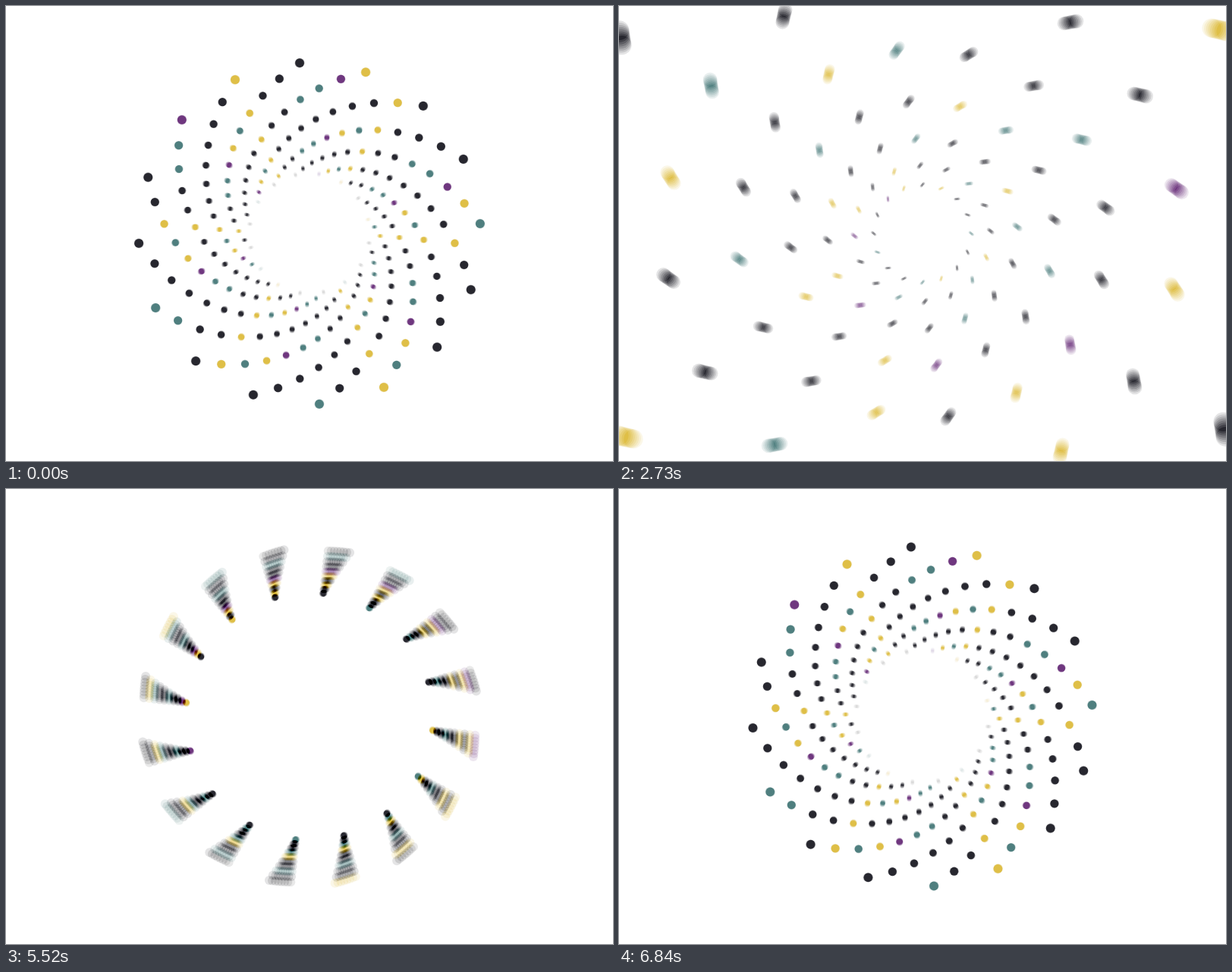
Recreate the animation shown at these times as an HTML page with a canvas. Size 800x600 px, loop 6.87 s.

```html
<!DOCTYPE html>
<html lang="en">
<head>
<meta charset="utf-8">
<title>Spiral of dots</title>
<style>
  html, body { margin: 0; width: 100%; height: 100%; overflow: hidden; background: #fff; }
  canvas { display: block; width: 800px; height: 600px; }
</style>
</head>
<body>
<canvas id="stage" width="800" height="600"></canvas>
<script>
const ctx = document.getElementById('stage').getContext('2d', { alpha: false });

const FRAME_MS = 30, FRAMES = 229, START = 94;
const SAMPLES = 8, SHUTTER = 0.5;
const DOT = 0.027;                      // dot size relative to its ring
const REACH = 530;                      // beyond this radius a ring is off stage
const { PI, exp, cos, sin, max, min } = Math;

// Dot colours clockwise round every ring
const PALETTE = { D: [40, 39, 44], Y: [221, 188, 70], T: [80, 128, 124], P: [110, 54, 125] };
const negative = rgb => `rgb(${rgb.map(v => 255 - v).join()})`;
const inks = [...'DYDDTDDYTDDTDDPY'].map(c => negative(PALETTE[c]));

const logistic = (t, mid, width) => 1 / (1 + exp((mid - t) / width));
const bell = (t, mid, width) => exp(-(((t - mid) / width) ** 2));

// Final fly-through, as a logarithm of scale
const zoom = t => 0.000515 * max(0, t - 152) ** 2.1;

// Springs open from the centre, then grows ever more slowly
function firstRadius(t) {
  const spring = 1 - exp(-t / 16) * cos(0.057 * t);
  return max(0, 68 * spring + 2.116 * t - 0.0047 * t * t) * exp(zoom(t));
}

// Turn of the first ring, in degrees
const firstAngle = t => -94.9 + 0.62 * t + 33.4 * sin(PI * (t - 46) / 92) + 56 * zoom(t);

// Log scale and turn from each ring to the next
const unfold = t => logistic(t, 48.4, 7.65);
const stepScale = t => 0.075 * unfold(t) - 0.7075 * bell(t, 150.8, 46.1);
const stepTurn = t => unfold(t) * (49.3 + 10.7 * cos(PI * (t - 92) / 65));

const ringCount = t => 1 + 12.2 * logistic(t, 43, 6) - 5.2 * logistic(t, 130, 4);

function drawRing(radius, angle, dot, alpha) {
  ctx.globalAlpha = alpha;
  inks.forEach((ink, i) => {
    const a = angle * PI / 180 + i * 2 * PI / inks.length;
    ctx.fillStyle = ink;
    ctx.beginPath();
    ctx.arc(400 + radius * sin(a), 300 - radius * cos(a), dot, 0, 2 * PI);
    ctx.fill();
  });
}

function drawSample(t) {
  const first = firstRadius(t), count = ringCount(t);
  for (let k = 0; k < count; k++) {
    const radius = first * exp(k * stepScale(t));
    if (radius > REACH) continue;
    const dot = max(k ? 0 : 1, DOT * radius);
    drawRing(radius, firstAngle(t) + k * stepTurn(t), dot, min(1, count - k) / SAMPLES);
  }
}

function fillStage(mode, colour) {
  ctx.globalCompositeOperation = mode;
  ctx.globalAlpha = 1;
  ctx.fillStyle = colour;
  ctx.fillRect(0, 0, 800, 600);
}

// Samples are summed as negatives, then the whole stage is inverted
function drawFrame(frame) {
  const time = (frame + START) % FRAMES;
  fillStage('source-over', '#000');
  ctx.globalCompositeOperation = 'lighter';
  for (let s = 0; s < SAMPLES; s++) {
    drawSample(time + SHUTTER * ((s + 0.5) / SAMPLES - 0.5));
  }
  fillStage('difference', '#fff');
}

const began = performance.now();
let shown = -1;
function tick() {
  const frame = Math.floor((performance.now() - began) / FRAME_MS) % FRAMES;
  if (frame !== shown) drawFrame(shown = frame);
  requestAnimationFrame(tick);
}
tick();
</script>
</body>
</html>
```
